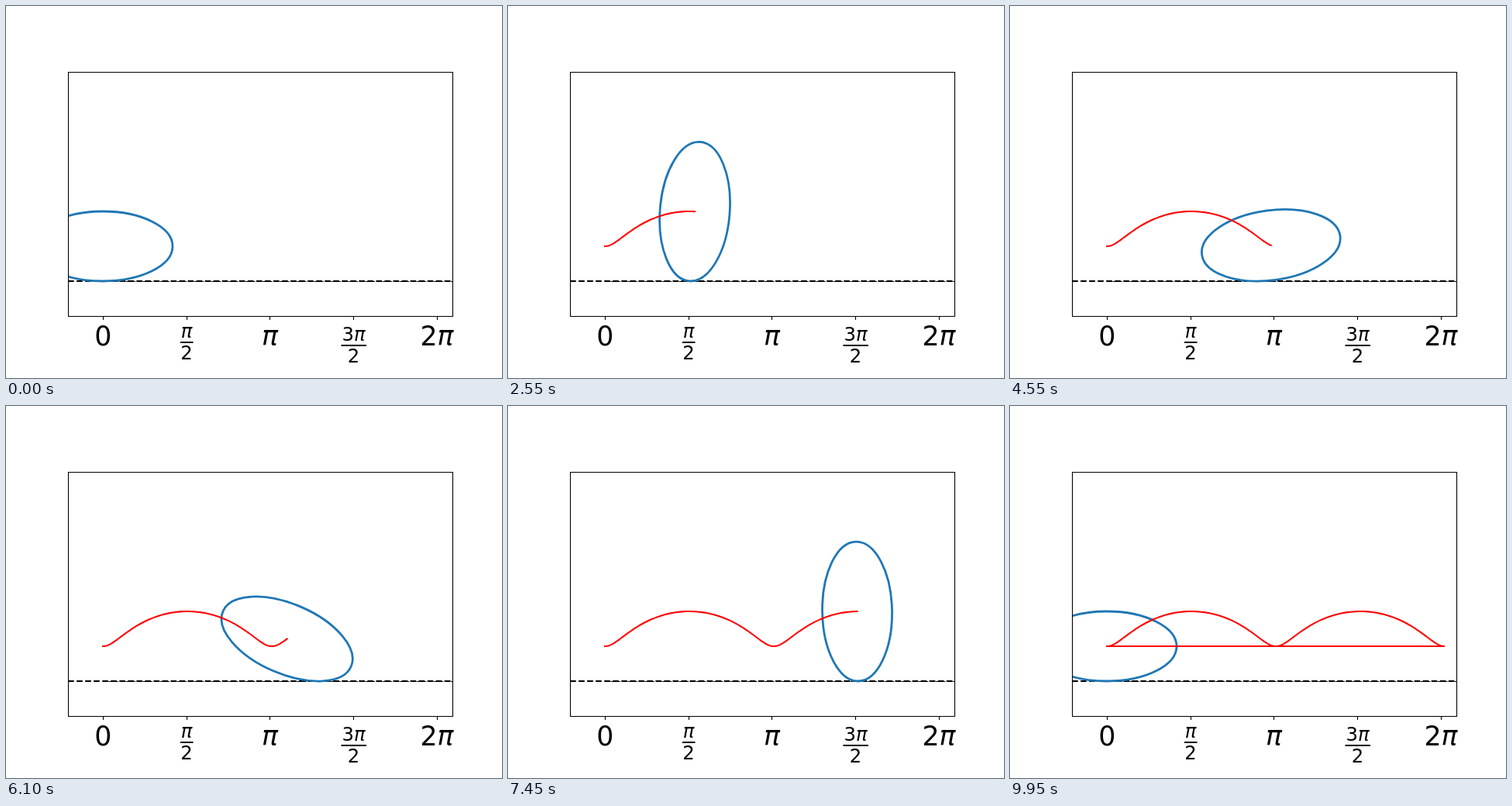
An HTML page that plays this animation: 640x480 px, repeating every 10000 ms.

```html
<!DOCTYPE html>
<html lang="en">
<head>
<meta charset="utf-8">
<title>Rolling ellipse</title>
<style>
  html, body { margin: 0; width: 100%; height: 100%; overflow: hidden; background: #fff; }
  svg { display: block; }
  text { font: 34.72px "DejaVu Sans", sans-serif; text-anchor: middle; }
  .small { font-size: 24.3px; }
  .pi { font-style: italic; }
</style>
</head>
<body>
<svg width="640" height="480" viewBox="0 0 640 480">
  <clipPath id="plot"><rect x="80" y="85" width="496" height="315"/></clipPath>
  <g clip-path="url(#plot)" fill="none">
    <path d="M80 355H576" stroke="#000" stroke-width="2" stroke-dasharray="7.71 3.33"/>
    <path d="M125 355.5H576" stroke="#000" stroke-dasharray="5.14 2.22"/>
    <path id="ellipse" d="M0 45A90 45 0 0 0 0 -45A90 45 0 0 0 0 45"
      stroke="#1f77b4" stroke-width="2.78" stroke-linecap="square"/>
    <polyline id="trace" stroke="#f00" stroke-width="2.08" stroke-linecap="square" stroke-linejoin="round"/>
  </g>
  <path d="M80.5 85.5H576.5V400.5H80.5ZM125.5 400V405M233.5 400V405M340.5 400V405M448.5 400V405M556.5 400V405"
    fill="none" stroke="#000" stroke-width="1.1"/>
  <text x="125.3" y="438">0</text>
  <text x="233" y="427.5" class="small pi">π</text>
  <path d="M225 434H241.5M432.5 438H465" stroke="#000" stroke-width="2"/>
  <text x="233" y="456" class="small">2</text>
  <text x="340.5" y="438" class="pi">π</text>
  <text x="448.5" y="432" class="small">3<tspan class="pi">π</tspan></text>
  <text x="448.5" y="460" class="small">2</text>
  <text x="556" y="438">2<tspan class="pi">π</tspan></text>
</svg>
<script>
const A = 90, B = 45, ORIGIN = 125, GROUND = 355;
const FRAMES = 200, FRAME_MS = 50, STEP = 2 * Math.PI / (FRAMES - 1);
const ellipse = document.getElementById("ellipse");
const trace = document.getElementById("trace");

const speed = phi => Math.hypot(A * Math.cos(phi), B * Math.sin(phi));

// Pose when the contact point has travelled `arc` along the rim.
function pose(phi, arc) {
  const theta = Math.atan2(B * Math.sin(phi), A * Math.cos(phi));
  const sin = Math.sin(theta), cos = Math.cos(theta);
  const height = Math.hypot(A * sin, B * cos);
  const offset = (A * A - B * B) * sin * cos / height;
  return { x: ORIGIN + arc - offset, y: GROUND - height, angle: theta * 180 / Math.PI };
}

const poses = [];
for (let i = 0, arc = 0; i < FRAMES - 1; i++) {
  poses.push(pose(i * STEP, arc));
  arc += speed((i + 0.5) * STEP) * STEP;
}
poses.push(poses[0]); // a full turn wraps back to the start

function draw() {
  const frame = Math.floor(performance.now() / FRAME_MS) % FRAMES;
  const { x, y, angle } = poses[frame];
  ellipse.setAttribute("transform", `translate(${x} ${y}) rotate(${angle})`);
  trace.setAttribute("points", poses.slice(0, frame + 1).map(p => `${p.x},${p.y}`).join(" "));
  requestAnimationFrame(draw);
}
draw();
</script>
</body>
</html>
```
